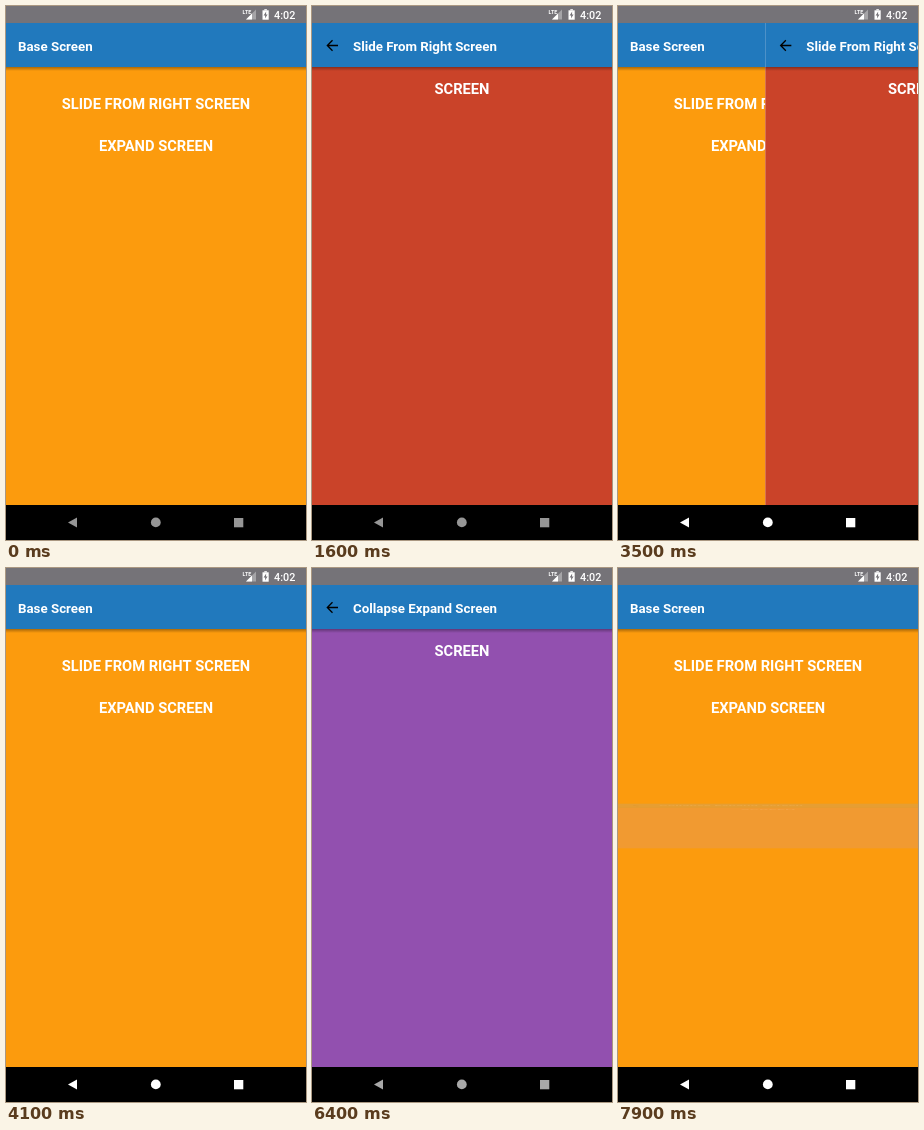
Recreate the animation shown at these times as an HTML page with a canvas. Size 300 px wide and 534 px high, loop 8000 ms.

```html
<!DOCTYPE html>
<html lang="en">
<head>
<meta charset="utf-8">
<title>Screen transitions</title>
<style>
  html, body { margin: 0; width: 100%; height: 100%; overflow: hidden; background: #000; }
  canvas { display: block; width: 100%; height: 100%; }
</style>
</head>
<body>
<canvas id="stage" width="300" height="534"></canvas>
<script>
const ctx = document.getElementById('stage').getContext('2d');
const LOOP = 8000, STEP = 100, TRANSITION = 785;
const W = 300, TOP = 17, HEADER = 44, BOTTOM = 499, MIDDLE = (TOP + BOTTOM) / 2;
const BLUE = '#2179bd', ORANGE = '#fc9b0d', RED = '#ca4329', PURPLE = '#9250af';

const clamp = x => Math.max(0, Math.min(1, x));
const smooth = x => (1 - Math.cos(Math.PI * clamp(x))) / 2;
const ramp = (t, start, length) => smooth((t - start) / length);
const quartOut = (t, start) => 1 - (1 - clamp((t - start) / TRANSITION)) ** 4;

function rect(x, y, w, h, fill) {
  ctx.fillStyle = fill;
  ctx.fillRect(x, y, w, h);
}

function shape(points, fill) {
  ctx.fillStyle = fill;
  ctx.beginPath();
  points.forEach(([x, y]) => ctx.lineTo(x, y));
  ctx.fill();
}

function text(label, x, y, size, align = 'center', weight = 700) {
  ctx.font = `${weight} ${size}px Roboto, sans-serif`;
  ctx.textAlign = align;
  ctx.fillStyle = '#fff';
  ctx.fillText(label, x, y);
}

function withAlpha(alpha, draw) {
  const before = ctx.globalAlpha;
  ctx.globalAlpha = before * alpha;
  draw();
  ctx.globalAlpha = before;
}

function backArrow() {
  ctx.strokeStyle = '#000';
  ctx.lineWidth = 1.3;
  ctx.beginPath();
  ctx.moveTo(26, 39.5);
  ctx.lineTo(15.5, 39.5);
  ctx.moveTo(20.5, 34.3);
  ctx.lineTo(15.3, 39.5);
  ctx.lineTo(20.5, 44.7);
  ctx.stroke();
}

// Every layer takes the current alpha on its own, so the pale backing shows through.
function card(title, color, titleX) {
  rect(0, TOP, W, BOTTOM - TOP, '#e9e9ef');
  rect(0, TOP + HEADER, W, BOTTOM - TOP - HEADER, color);
  const shadow = ctx.createLinearGradient(0, 61, 0, 65);
  shadow.addColorStop(0, 'rgba(0,0,0,.32)');
  shadow.addColorStop(1, 'rgba(0,0,0,0)');
  rect(0, 61, W, 4, shadow);
  rect(0, TOP, W, HEADER, BLUE);
  text(title, titleX, 44.7, 13.3, 'left');
}

function detailCard(title, color) {
  card(title, color, 41);
  backArrow();
  text('SCREEN', 150, 88, 14.7);
}

// Opacity of a button that is pressed, held and let go.
const pressed = (t, down, up) => 1 - 0.8 * (ramp(t, down, 150) - ramp(t, up, 250));

function baseCard(t) {
  card('Base Screen', ORANGE, 12);
  withAlpha(pressed(t, 450, 890), () => text('SLIDE FROM RIGHT SCREEN', 150, 103, 14.7));
  withAlpha(pressed(t, 4950, 5390), () => text('EXPAND SCREEN', 150, 144.5, 14.7));
}

function statusBar() {
  rect(0, 0, W, TOP, '#757378');
  text('LTE', 236.5, 8, 5.4, 'left');
  shape([[250, 3.5], [250, 13.5], [240, 13.5]], 'rgba(255,255,255,.35)');
  shape([[246, 7.5], [246, 13.5], [240, 13.5]], '#fff');
  rect(256.5, 4.3, 6.2, 9.4, '#fff');
  rect(258.3, 3.2, 2.6, 1.2, '#fff');
  shape([[260.2, 5.5], [257.6, 9.6], [259.2, 9.6], [259, 12.4], [261.6, 8.4], [260, 8.4]], '#757378');
  text('4:02', 268, 13, 10.8, 'left', 500);
}

function ripple(t, start) {
  const age = t - start;
  if (age < 0 || age > 460) return;
  const half = 39 * (1 - (1 - clamp(age / 350)) ** 3);
  ctx.fillStyle = `rgba(225,215,255,${0.2 * (1 - age / 460)})`;
  ctx.beginPath();
  ctx.roundRect(67 - half, 500, half * 2, 32, Math.min(half, 16));
  ctx.fill();
}

function navigationBar(t) {
  rect(0, BOTTOM, W, 35, '#000');
  ripple(t, 2960);
  ripple(t, 7165);
  const lit = ramp(t, 2950, 250) - ramp(t, 5300, 1500) + ramp(t, 7150, 250);
  withAlpha(0.59 + 0.41 * lit, () => {
    shape([[62, 516.5], [71, 511.5], [71, 521.5]], '#fff');
    ctx.beginPath();
    ctx.arc(149.8, 516.4, 4.9, 0, Math.PI * 2);
    ctx.fill();
    rect(228, 512, 9.3, 9.3, '#fff');
  });
}

function draw(t) {
  const slide = t < 3000 ? quartOut(t, 883) : 1 - quartOut(t, 3378);
  const expand = t < 7000 ? quartOut(t, 5382) : 1 - quartOut(t, 7548);
  baseCard(t);
  if (slide > 0) {
    ctx.save();
    ctx.translate(W * (1 - slide), 0);
    detailCard('Slide From Right Screen', RED);
    ctx.restore();
  }
  if (expand > 0) {
    ctx.save();
    ctx.globalAlpha = expand;
    ctx.translate(0, MIDDLE);
    ctx.scale(1, expand);
    ctx.translate(0, -MIDDLE);
    detailCard('Collapse Expand Screen', PURPLE);
    ctx.restore();
  }
  statusBar();
  navigationBar(t);
}

const begin = performance.now();
function tick() {
  const t = (performance.now() - begin) % LOOP;
  draw(Math.floor(t / STEP) * STEP);
  requestAnimationFrame(tick);
}
tick();
</script>
</body>
</html>
```
